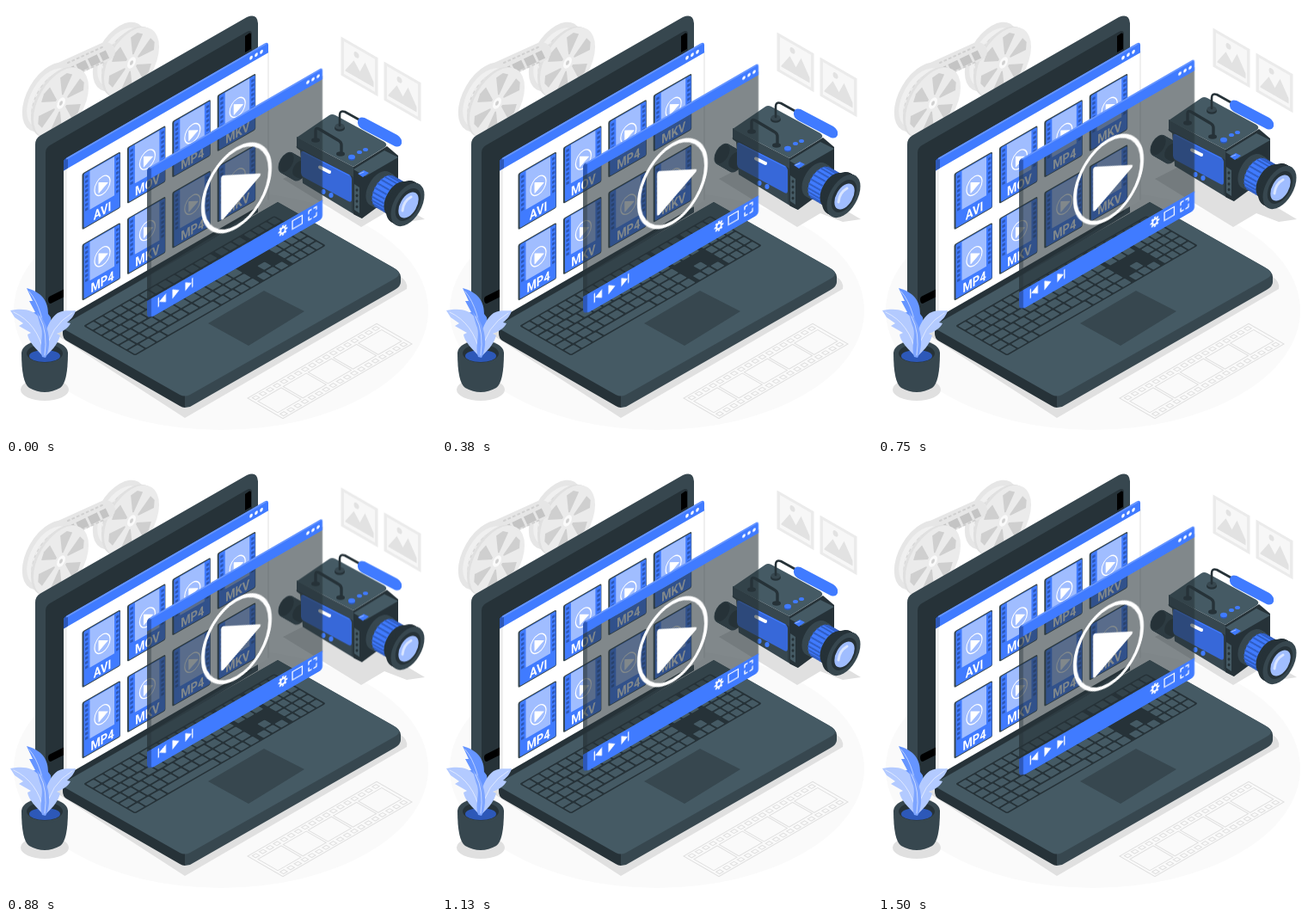
These frames come from a looping animation (500 by 500 pixels, 1.54 s). An HTML page:

```html
<!DOCTYPE html>
<html lang="en">
<head>
<meta charset="utf-8">
<title>Video formats</title>
<style>
html, body { margin: 0; width: 100%; height: 100%; overflow: hidden; background: #fff; }
svg { display: block; width: 100vw; height: 100vh; }
text { font: 700 15px Roboto, Arial, sans-serif; fill: #fff; text-anchor: middle; }
</style>
</head>
<body>
<svg id="stage" viewBox="0 0 500 500"></svg>
<script>
const BLUE = '#407bff', PALE = '#a0bdff', NAVY = '#2d58b8';
const INK = '#263238', SLATE = '#37474f', STEEL = '#455a64';
const K = 0.577;

// Isometric planes: wall rising right, wall falling right, floor
const rise = (x, y, s) => `<g transform="matrix(1 ${-K} 0 1 ${x} ${y})">${s}</g>`;
const fall = (x, y, s) => `<g transform="matrix(1 ${K} 0 1 ${x} ${y})">${s}</g>`;
const floor = (x, y, s) => `<g transform="matrix(1 ${-K} 1 ${K} ${x} ${y})">${s}</g>`;

const path = (d, fill, extra = '') => `<path d="${d}" fill="${fill}" ${extra}/>`;
const line = (d, color, w, extra = '') =>
  `<path d="${d}" fill="none" stroke="${color}" stroke-width="${w}" stroke-linecap="round" stroke-linejoin="round" ${extra}/>`;
const rect = (x, y, w, h, fill, extra = '') =>
  `<rect x="${x}" y="${y}" width="${w}" height="${h}" fill="${fill}" ${extra}/>`;
const oval = (x, y, rx, ry, fill, extra = '') =>
  `<ellipse cx="${x}" cy="${y}" rx="${rx}" ry="${ry}" fill="${fill}" ${extra}/>`;
const disc = (x, y, r, fill, extra) => rise(x, y, oval(0, 0, r * 0.866, r, fill, extra));
const many = (n, f) => Array.from({ length: n }, (_, i) => f(i)).join('');
const tube = (x, y, r, length, fill, extra) => many(length + 1, i => disc(x + i, y + i * K, r, fill, extra));

function reel(x, y) {
  const at = (a, r) => `${(Math.cos(a) * r * 0.866).toFixed(1)} ${(Math.sin(a) * r).toFixed(1)}`;
  const wedges = many(6, i => {
    const a = i * Math.PI / 3 + 0.77;
    return path(`M${at(a - 0.1, 9)}L${at(a - 0.28, 30)}L${at(a, 32)}L${at(a + 0.28, 30)}L${at(a + 0.1, 9)}Z`, '#cfcfcf');
  });
  return disc(x - 14, y - 7, 36, '#e6e6e6') +
    disc(x - 13, y - 6, 31, '#f0f0f0') +
    disc(x - 8, y - 3, 31, '#d6d6d6') +
    disc(x - 8, y - 3, 29, 'none', 'stroke="#f5f5f5" stroke-width="3" stroke-dasharray="3 3"') +
    disc(x - 3, y - 1, 37, '#e0e0e0') +
    disc(x, y, 37, '#ebebeb') +
    rise(x, y, wedges + oval(0, 0, 5, 6, '#fafafa') + oval(0, 0, 2, 2.4, '#d0d0d0'));
}

function reels() {
  return reel(146, 66) +
    line('M52 82L116 53', '#e6e6e6', 22) +
    line('M50 76L114 47M56 91L116 64', '#d0d0d0', 2, 'stroke-dasharray="2 4"') +
    `<path d="M70 79L118 56" stroke="#c4c4c4" stroke-width="10" stroke-dasharray="12 3"/>` +
    reel(64, 113);
}

function picture(x, y) {
  return fall(x, y,
    rect(0, 0, 43, 45, '#ebebeb') +
    rect(3.5, 3.5, 36, 38, '#f7f7f7') +
    path('M5 36L15 19 22 28 28 14 38 31V37H5Z', '#e2e2e2') +
    oval(18, 11, 3, 3.4, '#e2e2e2'));
}

function filmStrip() {
  const edge = 'stroke="#e0e0e0"';
  return floor(281, 456,
    rect(0, 0, 150, 41, 'none', edge) +
    many(5, i => rect(3 + i * 29.2, 9, 27, 23, 'none', edge)) +
    many(18, i => rect(3 + i * 8.2, 2.3, 4.5, 4, 'none', edge) + rect(3 + i * 8.2, 34.7, 4.5, 4, 'none', edge)));
}

function keyboard() {
  const key = (u, v, w, h = 8) => rect(u.toFixed(1), v, w.toFixed(1), h, STEEL, 'rx="1"');
  const row = (v, u, end, n) => {
    const step = (end - u) / n;
    return many(n, i => key(u + i * step, v, step - 1.8));
  };
  const main = [14, 14, 13, 12, 12].map((n, i) => row(1.5 + i * 9.8, 1.5, 148, n)).join('');
  const space = row(50.5, 1.5, 40, 3) + key(40, 50.5, 60) + row(50.5, 102, 148, 4);
  const nav = row(1.5, 151, 182, 3) + row(11.3, 151, 182, 3) + row(21.1, 151, 182, 3) + row(50.5, 151, 182, 3) + key(161.5, 40.7, 8.5);
  const pad = many(6, i => row(1.5 + i * 9.8, 185, 222, 4));
  return floor(90, 372, rect(0, 0, 222, 60, INK, 'rx="2"') + main + space + nav + pad);
}

function laptop() {
  const lid = path('M34 161Q34 154 40 150.5L280 13Q292 8 293 20V240L66 376 40 358Q34 354 34 348Z', SLATE) +
    path('M46 171Q46 165 51 162L280 30Q286 27 286 33V240L66 374 46 358Z', INK) +
    path('M278 35L283 31.5Q285 31 285 33V50L278 54Z', '#000') +
    path('M49 341Q49 338 52 337L68 329V338L52 346Q49 346 49 341Z', '#000');
  const base = path('M66 374Q66 371 71 368L316 228 450 304Q459 309 459 315V321Q459 326 452 330L214 466 208 467V440Z', SLATE) +
    path('M66 373L208 452V467Q205 467 202 465L70 389Q66 386 66 381Z', INK) +
    path('M68 376Q64 373 70 369L316 228 450 304Q463 311 452 317L214 452Q208 455 202 452Z', STEEL);
  return path('M58 382L208 479 466 329Q468 321 458 314L300 260Z', '#e0e0e0') + lid + base +
    path('M235 369L300 331 347 355 282 395Z', SLATE) + keyboard();
}

function fileIcon(x, y, label) {
  const holes = many(8, i => rect(2, 4 + i * 5.4, 3.4, 3, NAVY) + rect(38, 4 + i * 5.4, 3.4, 3, NAVY));
  return rise(x, y,
    rect(-1.5, -1, 44.5, 65.5, SLATE, 'rx="2"') +
    rect(0.5, 0.5, 42, 63, BLUE, 'rx="1.5"') +
    rect(7.5, 1, 28.5, 45, PALE) + holes +
    oval(22, 26.5, 9, 10.4, 'none', 'stroke="#fff" stroke-width="1.2"') +
    path('M18 21L28 26.7 18 32.5Z', '#fff', 'stroke="#fff" stroke-linejoin="round"') +
    `<text transform="translate(22 61) scale(.866 1)">${label}</text>`);
}

const dots = (x, y) => many(3, i => oval(x + i * 6, y, 1.8, 2.1, '#fff'));

function browser() {
  const labels = ['AVI', 'MOV', 'MP4', 'MKV', 'MP4', 'MKV', 'MP4', 'MKV'];
  return rise(67, 178.5,
    rect(0, 6, 238, 179, '#fff') + rect(0, 12, 4, 172, '#f0f0f0') +
    line('M238 12V184', '#e0e0e0', 1) +
    path('M0 13V3Q0 0 4 0H234Q238 0 238 4V13Z', BLUE) +
    path('M0 13V3Q0 0 4 0L5 3V13Z', NAVY) +
    line('M4 1H235', '#6796ff', 2) + dots(218, 7.5)) +
    labels.map((s, i) => fileIcon(90 + (i % 4) * 52.4, 195 - (i % 4) * 30.3 + (i > 3 ? 82.5 : 0), s)).join('');
}

function gear(x, y) {
  const teeth = many(8, i => `<path d="M0 -3V-6" stroke="#fff" stroke-width="2.2" transform="rotate(${i * 45})"/>`);
  return `<g transform="translate(${x} ${y}) scale(.866 1)">${teeth}${oval(0, 0, 3.2, 3.2, 'none', 'stroke="#fff" stroke-width="2"')}</g>`;
}

function player() {
  return rise(164, 189,
    rect(0, 10, 204, 146, INK, 'opacity=".58"') +
    rect(0, 10, 5, 146, INK, 'opacity=".4"') +
    path('M0 13V3Q0 0 4 0H200Q204 0 204 4V14H0Z', BLUE) +
    path('M0 14V3Q0 0 4 0L5 3V14Z', NAVY) +
    line('M4 1H201', '#6796ff', 2) + dots(187, 7.5) +
    path('M4 154H204V172Q204 176 200 176H8Q4 176 4 172Z', BLUE) +
    path('M0 154H5V175Q0 174 0 169Z', NAVY) +
    oval(104, 82.5, 39, 45.3, 'none', 'stroke="#fff" stroke-width="4"') +
    path('M88 61L130 83 88 108Z', '#fff', 'stroke="#fff" stroke-width="4" stroke-linejoin="round"') +
    path('M22 158V168L14 163ZM29.5 157.5L37.5 163 29.5 168.5ZM44.5 158L52 163 44.5 168Z', '#fff') +
    line('M13.3 158V168M52.7 158V168', '#fff', 1.2) +
    gear(158, 163) +
    rect(169, 158.5, 11.5, 9.5, 'none', 'stroke="#fff" stroke-width="1.2"') +
    line('M188 161V158H191M194 158H197V161M197 165V168.5H194M191 168.5H188V165', '#fff', 1.3));
}

function camera() {
  const eyepiece = tube(326, 182, 11, 16, SLATE) + disc(326, 182, 10, INK) + tube(340, 189, 8, 5, INK);
  const body = path('M338 152L404 189 414 247 406 243 345 206 342 168 338 165Z', SLATE) +
    path('M404 187L443 163 456 174V216L414 247 404 242Z', INK) +
    path('M338 153L376 127Q379 125 383 127L440 158Q444 161 441 164L404 187Z', STEEL) +
    path('M404 190L440 168 456 176 418 198Z', STEEL) +
    path('M338 153L404 187V196L338 163Z', SLATE) +
    line('M338 164L403 199V239', INK, 1);
  const side = path('M343 171Q343 168 346 169L399 196Q402 198 402 201V225Q402 229 398 227L346 199Q343 197 343 194Z', '#3768d9') +
    line('M346 170L399 197', BLUE, 1.2) +
    line('M365 187.5L376 193', '#fff', 4) +
    oval(369, 216, 2.6, 3, BLUE) + oval(378, 220, 2.6, 3, BLUE) +
    path('M405 207L411 211V241L405 237Z', STEEL) +
    many(4, i => oval(408, 214 + i * 6.5, 1.5, 1.8, INK)) +
    path('M409 195L416 191 422 194 415 199Z', BLUE) + line('M411 195L416 193', PALE, 1);
  const top = line('M360 155V145Q360 141 364 143L386 156Q390 158 390 162V171', INK, 3.4) +
    oval(360, 156, 5, 2.8, INK) + oval(389, 172, 5, 2.8, INK) +
    oval(402, 177, 4, 2.8, NAVY) + oval(402, 175.5, 4, 2.7, BLUE) +
    oval(411, 170, 3, 2, BLUE) + oval(418, 167, 3, 2, BLUE) +
    oval(388, 142, 6, 3.8, INK) + oval(388, 140, 5.5, 3.4, SLATE) +
    line('M388 139V127Q388 121 394 123L412 133', INK, 2.6) +
    path('M409 134Q410 128 417 130L455 150Q461 154 460 160Q458 165 452 163L414 143Q408 139 409 134Z', BLUE);
  const lens = tube(434, 212, 18, 5, SLATE) +
    tube(440, 215.5, 16.5, 13, BLUE, `stroke="${NAVY}" stroke-width="1.5" stroke-dasharray="1.5 3"`) +
    tube(455, 224, 18, 4, INK) +
    tube(461, 227.5, 22, 5, INK) + disc(467, 231, 22.5, SLATE) +
    disc(467.5, 231, 17, INK) + disc(468, 231.5, 13.5, PALE) +
    line('M461 238Q462 227 471 222', '#d9e5ff', 3);
  return eyepiece + body + side + top + lens;
}

function plant() {
  const leaf = (d, vein, fill) => path(d, fill) + line(vein, '#fff', 0.8, 'opacity=".7"');
  return oval(45, 446, 28, 13, '#e0e0e0') +
    path('M18 403Q18 438 27 444Q45 454 63 444Q72 438 72 403Z', SLATE) +
    oval(45, 403, 27, 14, SLATE) + oval(45, 404, 21, 10.5, INK) + oval(45, 407, 18, 7, NAVY) +
    leaf('M47 404C41 390 38 378 37 368L29 357 34 356 27 343 31 343 24 328C42 333 49 343 49 358L52 362C54 378 52 394 47 404Z', 'M27 332Q44 352 47 398', '#6695ff') +
    leaf('M44 408C35 399 26 390 25 382L29 380 15 372 20 369 10 362 5 354C20 351 32 353 38 362L41 361C47 376 49 394 44 408Z', 'M9 356Q37 369 44 404', '#b3caff') +
    leaf('M45 408C42 385 48 366 60 357C67 353 75 355 81 354C80 359 76 364 71 368L75 369C72 375 65 379 59 381L63 383C60 394 52 402 45 408Z', 'M77 357Q51 372 46 404', '#b3caff') +
    leaf('M42 408C38 396 44 384 41 374C38 366 37 361 36 356C47 366 51 382 50 394Q49 404 46 409Z', 'M39 361Q49 380 45 406', '#7ea5ff');
}

const group = (id, s) => `<g id="${id}">${s}</g>`;

document.getElementById('stage').innerHTML =
  oval(250, 354, 241, 139, '#fafafa') +
  reels() + filmStrip() +
  path('M322 201L365 179 440 220 487 248 466 251 440 241 413 257Z', '#e0e0e0') +
  group('pictures', picture(389.5, 35.5) + picture(439.5, 64.5)) +
  laptop() + browser() +
  group('camera', camera()) +
  group('player', player()) +
  plant();

// Each part bobs linearly up and back in 36 ticks at 24 per second; one extra tick closes the loop
const LOOP = 1540, TICKS = 37;

function bob(id, height) {
  const steps = Array.from({ length: TICKS }, (_, k) => ({
    offset: Math.round(k * 100 / 24) * 10 / LOOP,
    transform: `translateY(${-height * (1 - Math.abs(1 - k / 18))}px)`,
    easing: 'step-end'
  }));
  steps.push({ offset: 1, transform: 'translateY(0px)' });
  document.getElementById(id).animate(steps, { duration: LOOP, iterations: Infinity });
}

bob('pictures', 10);
bob('camera', 20);
bob('player', 10);
</script>
</body>
</html>
```
